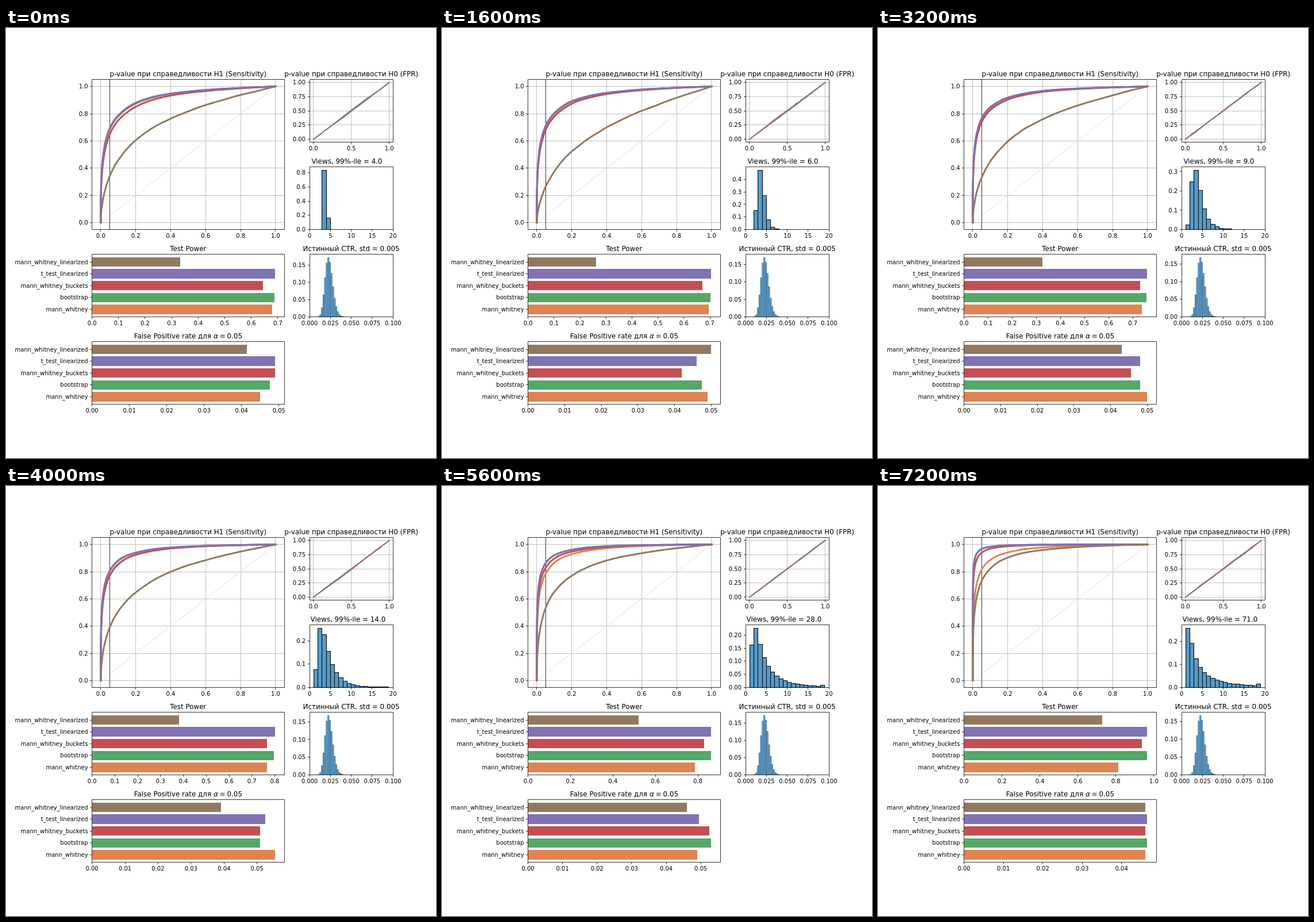
An HTML page that plays this animation: 748x748 px, repeating every 8 s.

```html
<!DOCTYPE html>
<html lang="ru">
<head>
<meta charset="utf-8">
<style>
html, body { margin: 0; width: 100%; height: 100%; overflow: hidden; background: #fff; }
svg { display: block; width: 748px; height: 748px; font: 10px "DejaVu Sans", sans-serif; }
.title { font-size: 11.92px; text-anchor: middle; white-space: pre; }
.mid { text-anchor: middle; }
.end { text-anchor: end; }
.axis { fill: none; stroke: #000; stroke-width: .8; }
.grid { fill: none; stroke: #b0b0b0; stroke-width: .8; }
.line { fill: none; stroke-linejoin: round; stroke-linecap: square; }
</style>
</head>
<body>
<svg id="stage" viewBox="0 0 748 748"></svg>
<script>
const HOLD = 800;
const TESTS = ['mann_whitney', 'bootstrap', 'mann_whitney_buckets', 't_test_linearized', 'mann_whitney_linearized'];
const COLORS = ['#dd8452', '#55a868', '#c44e52', '#8172b3', '#937860'];

// sigma of log views, peak of the CTR histogram, power and false positive rate per test
const STEPS = [
  { s: .1, peak: .1715, power: [.679, .688, .6435, .69, .333], fpr: [.045, .0475, .049, .049, .0415] },
  { s: .2, peak: .171, power: [.683, .688, .649, .689, .2505], fpr: [.053, .0495, .044, .049, .0535] },
  { s: .3, peak: .1705, power: [.695, .7025, .672, .705, .262], fpr: [.049, .0475, .042, .046, .05] },
  { s: .4, peak: .1697, power: [.707, .717, .6945, .7215, .2755], fpr: [.0445, .045, .04, .0435, .0465] },
  { s: .5, peak: .1685, power: [.737, .757, .73, .76, .325], fpr: [.05, .048, .0455, .048, .043] },
  { s: .7, peak: .168, power: [.765, .797, .765, .802, .381], fpr: [.0555, .051, .051, .0525, .039] },
  { s: .9, peak: .1675, power: [.779, .839, .808, .839, .472], fpr: [.0385, .039, .0435, .04, .0475], bump: .022 },
  { s: 1, peak: .1715, power: [.786, .8625, .8285, .863, .522], fpr: [.049, .053, .0525, .0495, .046] },
  { s: 1.2, peak: .169, power: [.8, .918, .885, .92, .63], fpr: [.0475, .05, .049, .048, .046] },
  { s: 1.4, peak: .1668, power: [.812, .965, .9375, .965, .728], fpr: [.046, .0465, .046, .0465, .046] }
];

const stage = document.getElementById('stage');
const snap = v => Math.floor(v) + .5;
const text = (x, y, cls, s) => `<text x="${x}" y="${Math.round(y)}" class="${cls}">${s}</text>`;
const range = (n, f) => Array.from({ length: n }, (_, i) => f(i));

// normal distribution function
function phi(z) {
  const t = 1 / (1 + .2316419 * Math.abs(z));
  const tail = Math.exp(-z * z / 2) * .39894228 * t *
    (.31938153 + t * (-.356563782 + t * (1.781477937 + t * (-1.821255978 + t * 1.330274429))));
  return z > 0 ? 1 - tail : tail;
}

function phiInv(p) {
  let lo = -5, hi = 5;
  for (let i = 0; i < 40; i++) {
    const m = (lo + hi) / 2;
    if (phi(m) < p) lo = m; else hi = m;
  }
  return lo;
}

function random(seed) {
  let a = seed * 7919 + 17;
  return () => {
    a = (a + 0x6D2B79F5) | 0;
    let t = Math.imul(a ^ a >>> 15, 1 | a);
    t = t + Math.imul(t ^ t >>> 7, 61 | t) ^ t;
    return ((t ^ t >>> 14) >>> 0) / 4294967296;
  };
}

// sampling error of an empirical distribution over [0, 1]
function bridge(seed, size) {
  const rnd = random(seed);
  const amps = range(40, k => size * (rnd() + rnd() + rnd() - 1.5) * 2 / (k + 1));
  return v => amps.reduce((sum, a, k) => sum + a * Math.sin((k + 1) * Math.PI * v), 0);
}

function niceStep(max, bins) {
  const raw = max / bins, mag = 10 ** Math.floor(Math.log10(raw));
  return [1, 2, 2.5, 5, 10].map(m => m * mag).find(v => v >= raw * .99999);
}

function ticks(max, bins) {
  const step = niceStep(max, bins), digits = step < .0999 ? 2 : 1;
  return range(Math.floor(max / step + 1e-6) + 1, i => [i * step, (i * step).toFixed(digits)]);
}

const fixed = (vals, digits) => vals.map(v => [v, v.toFixed(digits)]);

function frame(x, y, w, h, x0, x1, y0, y1) {
  return {
    x, y, w, h,
    X: v => x + (v - x0) / (x1 - x0) * w,
    Y: v => y + h - (v - y0) / (y1 - y0) * h
  };
}

function grid(f, xt, yt) {
  const v = xt.map(([t]) => `M${snap(f.X(t))} ${f.y}v${f.h}`);
  const h = yt.map(([t]) => `M${f.x} ${snap(f.Y(t))}h${f.w}`);
  return `<path class="grid" d="${v.join('')}${h.join('')}"/>`;
}

function axes(f, xt, yt, title, shift = 0) {
  const l = snap(f.x), t = snap(f.y), r = snap(f.x + f.w), b = snap(f.y + f.h);
  let d = `M${l} ${t}H${r}V${b}H${l}Z`, out = '';
  for (const [v, s] of xt) {
    d += `M${snap(f.X(v))} ${b}v3.5`;
    out += text(f.X(v), f.y + f.h + 14.9, 'mid', s);
  }
  for (const [v, s] of yt) {
    d += `M${l} ${snap(f.Y(v))}h-3.5`;
    out += text(f.x - 7, f.Y(v) + 3.65, 'end', s);
  }
  return `<path class="axis" d="${d}"/>` + out + text(f.x + f.w / 2 + shift, f.y - 5.8, 'title', title);
}

function line(f, pts, color, width) {
  const d = pts.map(([x, y]) => f.X(x).toFixed(2) + ' ' + f.Y(y).toFixed(2)).join('L');
  return `<path class="line" stroke="${color}" stroke-width="${width}" d="M${d}"/>`;
}

const rect = (x, y, w, h, style) => `<rect x="${x}" y="${y}" width="${w}" height="${h}" ${style}/>`;

const LEFT = 149.6, WIDE = 334.6, RIGHT = 528.1, SLIM = 145.1, TALL = 108.6;
const row = k => 89.8 + 152.05 * k;

// two-sided test with the given power at alpha = 0.05
function rocCurve(power, noise) {
  const d = 1.96 + phiInv(power), pts = [[0, 0]];
  let top = 0;
  for (let u = 4; u >= 0; u -= .0125) {
    const y = phi(d - u) + phi(-d - u);
    top = Math.max(top, Math.min(1, y + noise(y)));
    pts.push([2 * phi(-u), top]);
  }
  pts.push([1, 1]);
  return pts;
}

function sensitivity(step, n) {
  const f = frame(LEFT, row(0), WIDE, row(1) + TALL - row(0), -.05, 1.05, -.05, 1.05);
  const t = fixed([0, .2, .4, .6, .8, 1], 1);
  let out = grid(f, t, t) + line(f, [[0, 0], [1, 1]], '#dedede', 1);
  out += `<path class="axis" style="stroke-width:1;stroke:#333" d="M${snap(f.X(.05))} ${f.y}v${f.h}"/>`;
  step.power.forEach((p, i) => {
    out += line(f, rocCurve(p, bridge(n * 2 + (i > 3 ? 1 : 0) + 5, .003)), COLORS[i], 3);
  });
  return out + axes(f, t, t, 'p-value при справедливости H1 (Sensitivity)');
}

function falsePositives(step, n) {
  const f = frame(RIGHT, row(0), SLIM, TALL, -.05, 1.05, -.05, 1.05);
  const xt = fixed([0, .5, 1], 1), yt = fixed([0, .25, .5, .75, 1], 2);
  let out = grid(f, xt, yt);
  COLORS.forEach((c, i) => {
    const noise = bridge(200 + n * 5 + i, .006);
    const bump = i === 4 && step.bump || 0;
    const pts = range(101, k => {
      const x = k / 100;
      return [x, x + noise(x) + bump * Math.exp(-(((x - .42) / .12) ** 2))];
    });
    out += line(f, pts, c, 1.5);
  });
  return out + axes(f, xt, yt, 'p-value при справедливости H0 (FPR)');
}

function views(step) {
  const cdf = v => v > 0 ? phi((Math.log(v) - 1) / step.s) : 0;
  const total = cdf(19);
  const probs = range(18, i => (cdf(i === 17 ? 19 : i + 1) - cdf(i)) / total);
  const max = Math.max(...probs) * 1.05;
  const f = frame(RIGHT, row(1), SLIM, TALL, 0, 20, 0, max);
  let out = '';
  probs.forEach((p, i) => {
    if (p < 3e-4) return;
    const x = snap(f.X(i + 1)), y = snap(f.Y(p));
    out += rect(x, y, snap(f.X(i + 2)) - x, snap(f.Y(0)) - y, 'fill="#5799c7" stroke="#000" stroke-width="1"');
  });
  const label = (Math.floor(Math.exp(1 + 2.3263 * step.s)) + 1).toFixed(1);
  const xt = fixed([0, 5, 10, 15, 20], 0);
  // the number is padded to seven characters, which moves the title left
  return out + axes(f, xt, ticks(max, 5), 'Views, 99%-ile = ' + label, (label.length - 7) * 1.907);
}

function trueRate(step) {
  const bin = .0019, start = .0006, shape = 26, mean = .0234;
  const dens = x => Math.exp((shape - 1) * Math.log(x / mean) - shape * (x / mean - 1));
  const heights = range(24, i => dens(start + bin * (i + .5)));
  const max = Math.max(...heights), top = step.peak * 1.05;
  const f = frame(RIGHT, row(2), SLIM, TALL, 0, .1, 0, top);
  let out = '';
  heights.forEach((h, i) => {
    if (h / max < .003) return;
    const x = f.X(start + bin * i), y = f.Y(h / max * step.peak);
    out += rect(x, y, f.X(bin) - f.x, f.Y(0) - y, 'fill="#5799c7" stroke="#000" stroke-width=".22"');
  });
  return out + axes(f, fixed([0, .025, .05, .075, .1], 3), ticks(top, 5), 'Истинный CTR, std = 0.005');
}

function bars(k, vals, title) {
  const max = Math.max(...vals) * 1.05;
  const f = frame(LEFT, row(k), WIDE, TALL, 0, max, -.64, 4.64);
  let out = '';
  vals.forEach((v, i) => {
    const y = Math.round(f.Y(i + .4));
    out += rect(150, y, Math.round(f.X(v)) - 150, Math.round(f.Y(i - .4)) - y, `fill="${COLORS[i]}"`);
  });
  return out + axes(f, ticks(max, 9), TESTS.map((s, i) => [i, s]), title);
}

function draw(n) {
  const step = STEPS[n];
  stage.innerHTML = sensitivity(step, n) + falsePositives(step, n) + views(step) + trueRate(step) +
    bars(2, step.power, 'Test Power') +
    bars(3, step.fpr, 'False Positive rate для <tspan font-style="italic">α</tspan>' +
      '<tspan dx="-.9"> =</tspan><tspan dx="-.9"> 0.05</tspan>');
}

let shown = -1;
function tick() {
  const n = Math.floor(performance.now() / HOLD) % STEPS.length;
  if (n !== shown) draw(shown = n);
  requestAnimationFrame(tick);
}
tick();
</script>
</body>
</html>
```
